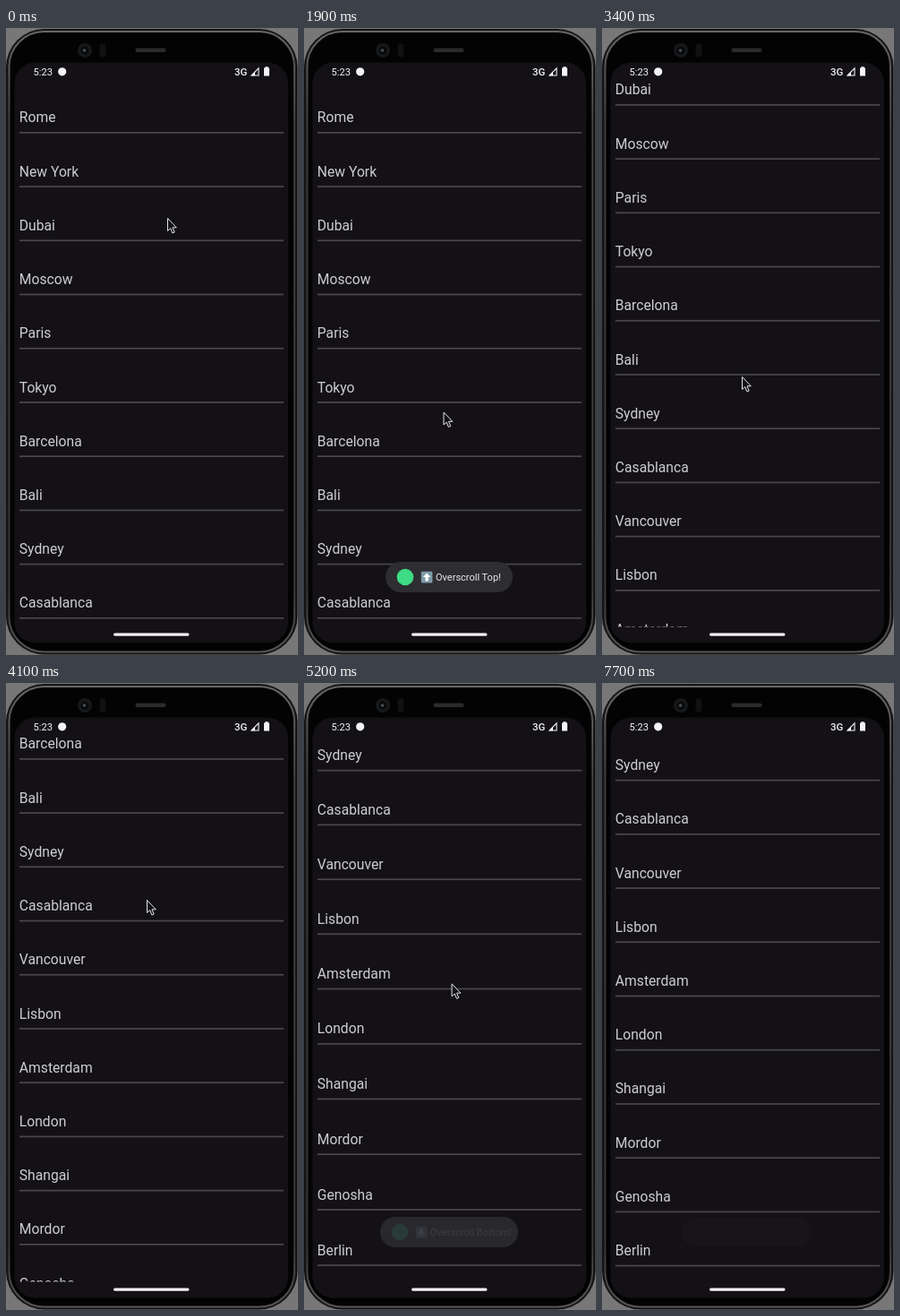
Write an HTML page that moves like this. It is 326 px wide and 700 px high and loops after 8.4 s.

```html
<!DOCTYPE html>
<html lang="en">
<head>
<meta charset="utf-8">
<title>Overscroll list</title>
<style>
  html, body { margin: 0; width: 100%; height: 100%; overflow: hidden; background: #777; }
  svg { display: block; width: 326px; height: 700px; font-family: Roboto, sans-serif; }
</style>
</head>
<body>
<svg viewBox="0 0 326 700">
  <defs>
    <linearGradient id="rim" x2="0" y2="1">
      <stop offset="0" stop-color="#666"/>
      <stop offset=".15" stop-color="#3c3c3c"/>
      <stop offset=".9" stop-color="#333"/>
      <stop offset="1" stop-color="#555"/>
    </linearGradient>
    <clipPath id="view"><rect x="9" y="58" width="306" height="610.5"/></clipPath>
  </defs>

  <!-- Phone body -->
  <rect width="326" height="700" fill="#777"/>
  <rect x="0" y="1" width="325.5" height="698.5" rx="43" fill="#141414"/>
  <rect x="3.5" y="4" width="318.5" height="692.5" rx="39" fill="#030303" stroke="url(#rim)" stroke-width="2"/>
  <rect x="9.5" y="38.5" width="305.5" height="648" rx="23" fill="#131116"/>
  <circle cx="88" cy="25" r="8" fill="#17181a"/>
  <circle cx="88" cy="25" r="4.5" fill="#08090b"/>
  <circle cx="87.5" cy="25" r="1.8" fill="#4a4f55"/>
  <rect x="104.5" y="17.5" width="7" height="15" rx="3" fill="#111"/>
  <rect x="144.5" y="22.5" width="34" height="4.5" rx="2" fill="#2a2a2a"/>

  <g id="list" clip-path="url(#view)" font-size="15.7" fill="#cecdd1"></g>

  <!-- Status bar -->
  <g fill="#f4f4f4">
    <text x="30.5" y="52.7" font-size="11.2">5:23</text>
    <circle cx="62.7" cy="48.8" r="4.6"/>
    <text x="255" y="52.5" font-size="11.5" font-weight="500">3G</text>
    <path d="M274 53H282V44.800Z" fill="none" stroke="#f4f4f4" stroke-width="1.1"/>
    <path d="M273.500 53.300L278 49V53.300Z"/>
    <path d="M289.300 43.200h3.400v1.200h1.300v9h-6v-9h1.300z"/>
  </g>

  <g id="toasts" font-size="11"></g>
  <rect x="120" y="675.5" width="84.5" height="3.2" rx="1.6" fill="#f2f0f4"/>
  <path id="cursor" d="M.500 .500V14.500L3.700 11.600 5.900 17 8.200 16 6 10.800H10.300Z"
        fill="#131116" stroke="#e4e4e4" stroke-linejoin="round"/>
</svg>
<script>
const LOOP = 8400, STEP = 100, STILL = 7700, POINTER_GONE = 7500;
const ROW = 60.22, FIRST_LINE = 116.9, LAST_LINE = 651;
const cities = ['Rome', 'New York', 'Dubai', 'Moscow', 'Paris', 'Tokyo', 'Barcelona', 'Bali', 'Sydney',
  'Casablanca', 'Vancouver', 'Lisbon', 'Amsterdam', 'London', 'Shangai', 'Mordor', 'Genosha', 'Berlin'];

const swipes = [
  { from: 2500, to: 3520, by: 152.4 },
  { from: 3400, to: 4100, by: 240.9 },
  { from: 4100, to: 5000, by: 96.7 }
];
const pointerStart = { x: 180, y: 212 };
const pointerMoves = [
  { from: 0, to: 400, x: 176, y: 183 },
  { from: 600, to: 1200, x: 159, y: 407 },
  { from: 1600, to: 2200, x: 152, y: 450 },
  { from: 2600, to: 3200, x: 152, y: 365 },
  { from: 3200, to: 3400, x: 156, y: 389 },
  { from: 3500, to: 4100, x: 157, y: 242 },
  { from: 4200, to: 4700, x: 166, y: 424 },
  { from: 4700, to: 5550, x: 164, y: 301 },
  { from: 6700, to: 7000, x: 160, y: 155 }
];
const toasts = [
  { text: 'Overscroll Top!', width: 142, arrow: 1, show: 900, hide: 3000 },
  { text: 'Overscroll Bottom!', width: 154, arrow: -1, show: 5100, hide: 7400 }
];

const byId = id => document.getElementById(id);
const ramp = (t, from, to) => Math.min(1, Math.max(0, (t - from) / (to - from)));
const ease = p => p < .5 ? 4 * p ** 3 : 1 - 4 * (1 - p) ** 3;
const glide = (t, { from, to }) => ease(ramp(t, from, to));
const pull = (t, from, peak, to) => Math.sin(Math.PI / 2 * ramp(t, from, peak)) * (1 - ease(ramp(t, peak, to)));

function add(parent, tag, attrs, text) {
  const el = document.createElementNS('http://www.w3.org/2000/svg', tag);
  for (const key in attrs) el.setAttribute(key, attrs[key]);
  if (text) el.textContent = text;
  return parent.appendChild(el);
}

const rows = cities.map(name => {
  const g = add(byId('list'), 'g');
  add(g, 'text', { x: 14.8, y: -11.5 }, name);
  add(g, 'rect', { x: 15, y: -.9, width: 295, height: 1.7, fill: '#49474c' });
  return g;
});

for (const toast of toasts) {
  const { width, arrow, text } = toast;
  const x = 162 - width / 2;
  toast.el = add(byId('toasts'), 'g');
  toast.box = add(toast.el, 'rect', { x, y: 596, width, height: 34, rx: 17, fill: '#2d2d32' });
  toast.content = add(toast.el, 'g');
  add(toast.content, 'circle', { cx: x + 22, cy: 613, r: 9.3, fill: '#3ddc84' });
  add(toast.content, 'rect', { x: x + 39.8, y: 606.8, width: 12.6, height: 12.6, rx: 1.2, fill: '#7d9aa8' });
  add(toast.content, 'path', {
    d: 'M0-4.500L4.200 0H1.600V4.300H-1.600V0H-4.200Z', fill: '#fff',
    transform: `translate(${x + 46.1} 613.1) scale(1 ${arrow})`
  });
  add(toast.content, 'text', { x: x + 56, y: 617, fill: '#e9e7ec' }, text);
}

// Stretch weakens with distance from the pulled edge
function stretch(y, top, bottom) {
  const u = y - FIRST_LINE, v = LAST_LINE - y;
  return y + top * (-1.6 + .023 * u - 1.62e-5 * u * u)
           - bottom * (.5 + .0318 * v - 2.3e-5 * v * v);
}

function drawList(t) {
  const offset = swipes.reduce((sum, s) => sum + s.by * glide(t, s), 0);
  const top = pull(t, 600, 1200, 1500), bottom = pull(t, 5000, 5200, 5700);
  rows.forEach((row, i) => {
    const y = stretch(FIRST_LINE + i * ROW - offset, top, bottom);
    row.setAttribute('transform', `translate(0 ${y.toFixed(2)})`);
  });
}

function drawToast({ el, box, content, show, hide }, t) {
  const leave = ramp(t, hide, hide + 360);
  box.setAttribute('opacity', ramp(t, show, show + 120) * (1 - leave));
  content.setAttribute('opacity', ramp(t, show + 80, show + 280) * (1 - ramp(t, hide, hide + 250)));
  el.setAttribute('transform', `translate(162 613) scale(${1 - .065 * leave}) translate(-162 -613)`);
}

function drawPointer(t) {
  let { x, y } = pointerStart;
  for (const move of pointerMoves) {
    const p = glide(t, move);
    x += (move.x - x) * p;
    y += (move.y - y) * p;
  }
  byId('cursor').setAttribute('transform', `translate(${x} ${y})`);
  byId('cursor').setAttribute('visibility', t < POINTER_GONE ? 'visible' : 'hidden');
}

function tick() {
  const now = performance.now() % LOOP;
  const t = Math.min(STILL, Math.floor(now / STEP) * STEP);
  drawList(t);
  toasts.forEach(toast => drawToast(toast, t));
  drawPointer(t);
  requestAnimationFrame(tick);
}
tick();
</script>
</body>
</html>
```
